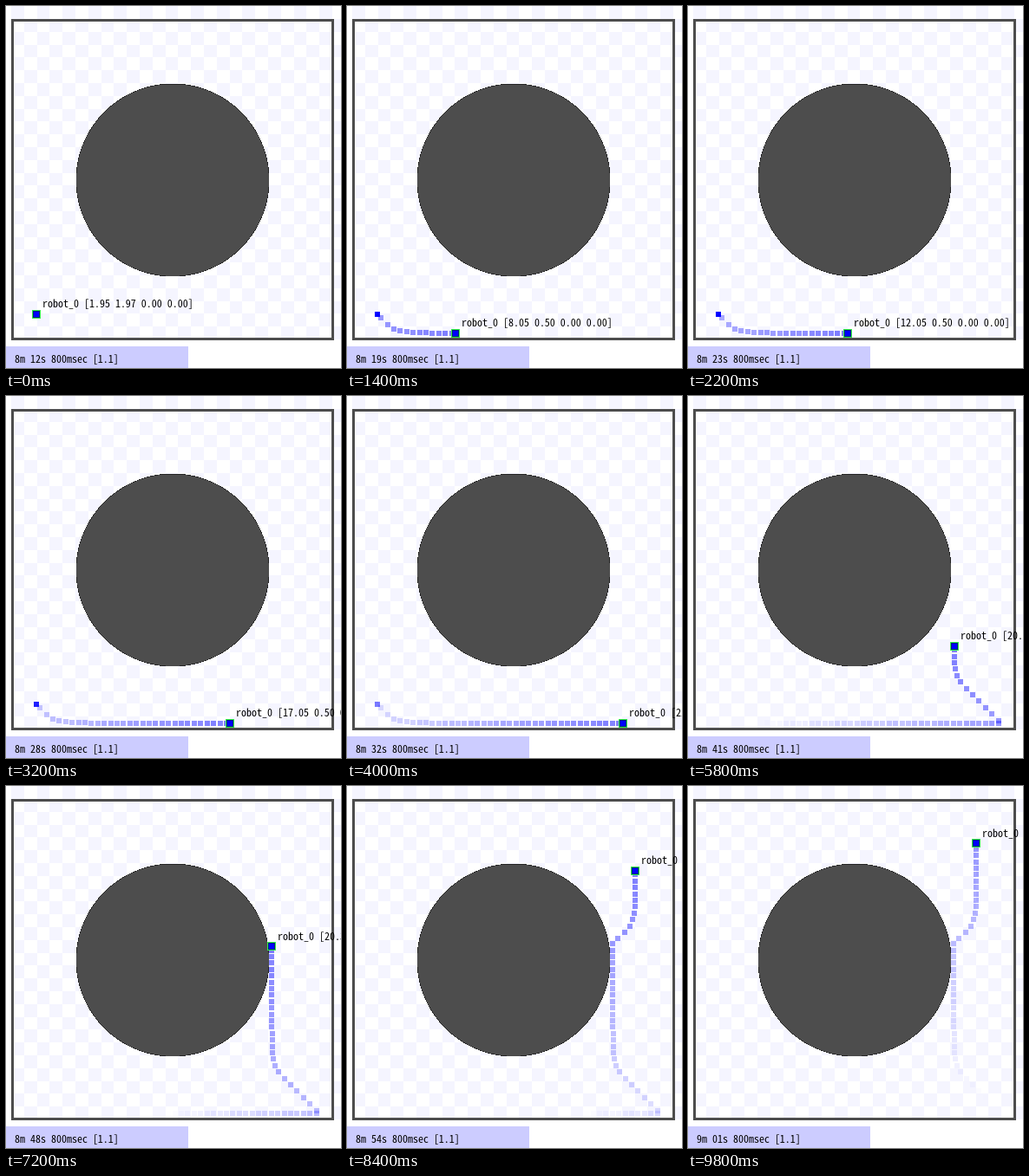
An HTML page with a canvas for the animation above (10 s loop, 386 px wide and 418 px high).

```html
<!DOCTYPE html>
<html lang="en">
<head>
<meta charset="utf-8">
<title>Robot trail simulation</title>
<style>
  html, body { margin: 0; width: 100%; height: 100%; overflow: hidden; background: #fff; }
  canvas { display: block; }
</style>
</head>
<body>
<canvas id="stage" width="386" height="418"></canvas>
<script>
const ctx = document.getElementById('stage').getContext('2d');
const W = 386, H = 418;
const UNIT = 14.8, LEFT = 6, FLOOR = 385;
const STEP = 200, LOOP = 10000;
const START_CLOCK = 492;
const TRAIL_AGE = 25, TRAIL_GAP = 0.5, TRAIL_LAG = 0.3;
const TAIL = 0.7;

const px = x => LEFT + x * UNIT;
const py = y => FLOOR - y * UNIT;

function rect(color, x, y, w, h) {
  ctx.fillStyle = color;
  ctx.fillRect(x, y, w, h);
}

function square(color, cx, cy, size) {
  rect(color, Math.round(cx - size / 2), Math.round(cy - size / 2), size, size);
}

// Distance covered at unit speed, easing out exponentially near the end.
function glide(t, dist) {
  const cruise = dist - TAIL;
  if (t <= 0) return 0;
  return t < cruise ? t : dist - TAIL * Math.exp((cruise - t) / TAIL);
}

function robotX(t) {
  if (t < 22.95) return 1.95 + Math.max(0, t - 0.9);
  if (t < 36.3) return 24 - glide(t - 22.95, 3.7);
  return 20.3 + glide(t - 36.3, 1.75);
}

function robotY(t) {
  if (t < 23) return 1.97 - glide(t - 0.9, 1.47);
  if (t < 36.2) return t - 22.5;
  return Math.min(21.55, 13.7 + Math.max(0, t - 36.3));
}

function disc(color, cx, cy, r) {
  for (let y = Math.ceil(cy - r); y < cy + r; y++) {
    const dy = y + 0.5 - cy;
    const half = Math.sqrt(Math.max(0, r * r - dy * dy));
    const x0 = Math.round(cx - half), x1 = Math.round(cx + half);
    rect(color, x0, y, x1 - x0, 1);
  }
}

function drawFloor() {
  rect('#fff', 0, 0, W, H);
  for (let i = 0; i < 26; i++) {
    for (let j = 0; j < 26; j++) {
      if ((i + j) % 2 === 0) continue;
      const x = Math.round(px(i)), y = Math.round(py(j + 1));
      rect('#f5f5ff', x, y, Math.round(px(i + 1)) - x, Math.round(py(j)) - y);
    }
  }
}

function drawWalls() {
  ctx.strokeStyle = '#4d4d4d';
  ctx.lineWidth = 3;
  ctx.strokeRect(7.5, 16.5, 369, 368);
  disc('#262626', 192, 201, 111.5);
  disc('#4d4d4d', 192, 201, 110.8);
}

function drawTrail(now) {
  for (let age = TRAIL_AGE - TRAIL_GAP + TRAIL_LAG; age > 0; age -= TRAIL_GAP) {
    const alpha = 0.5 * (1 - age / TRAIL_AGE);
    const t = now - age;
    square(`rgba(0,0,255,${alpha})`, px(robotX(t)), py(robotY(t)), 6);
  }
}

function drawRobot(x, y) {
  const cx = Math.round(px(x)), cy = Math.round(py(y));
  square('#33f04c', cx, cy, 10);
  square('#00207a', cx, cy, 8);
  square('#0000ff', cx, cy, 6);
}

// Font size that gives a character advance of six pixels.
function setFont() {
  const family = '"Noto Sans Mono CJK JP", "Noto Sans Mono CJK SC", "Liberation Mono", monospace';
  ctx.font = `12px ${family}`;
  const size = 12 * 6 / ctx.measureText('0').width;
  ctx.font = `${size}px ${family}`;
}

function label(text, x, y) {
  ctx.fillStyle = '#000';
  ctx.fillText(text, Math.round(x), Math.round(y));
}

function draw(sec) {
  const x = robotX(sec), y = robotY(sec);
  drawFloor();
  drawWalls();
  drawTrail(sec);
  drawRobot(x, y);
  setFont();
  label(`robot_0 [${x.toFixed(2)} ${y.toFixed(2)} 0.00 0.00]`, px(x) + 7, py(y) - 7.5);

  rect('#ccccff', 0, 393, 210, 25);
  const clock = START_CLOCK + sec;
  const s = String(clock % 60).padStart(2, '0');
  label(`${Math.floor(clock / 60)}m ${s}s 800msec [1.1]`, 10, 412);
}

const begin = performance.now();
function tick() {
  const elapsed = Math.max(0, performance.now() - begin) % LOOP;
  draw(Math.floor(elapsed / STEP));
  requestAnimationFrame(tick);
}
tick();
</script>
</body>
</html>
```
